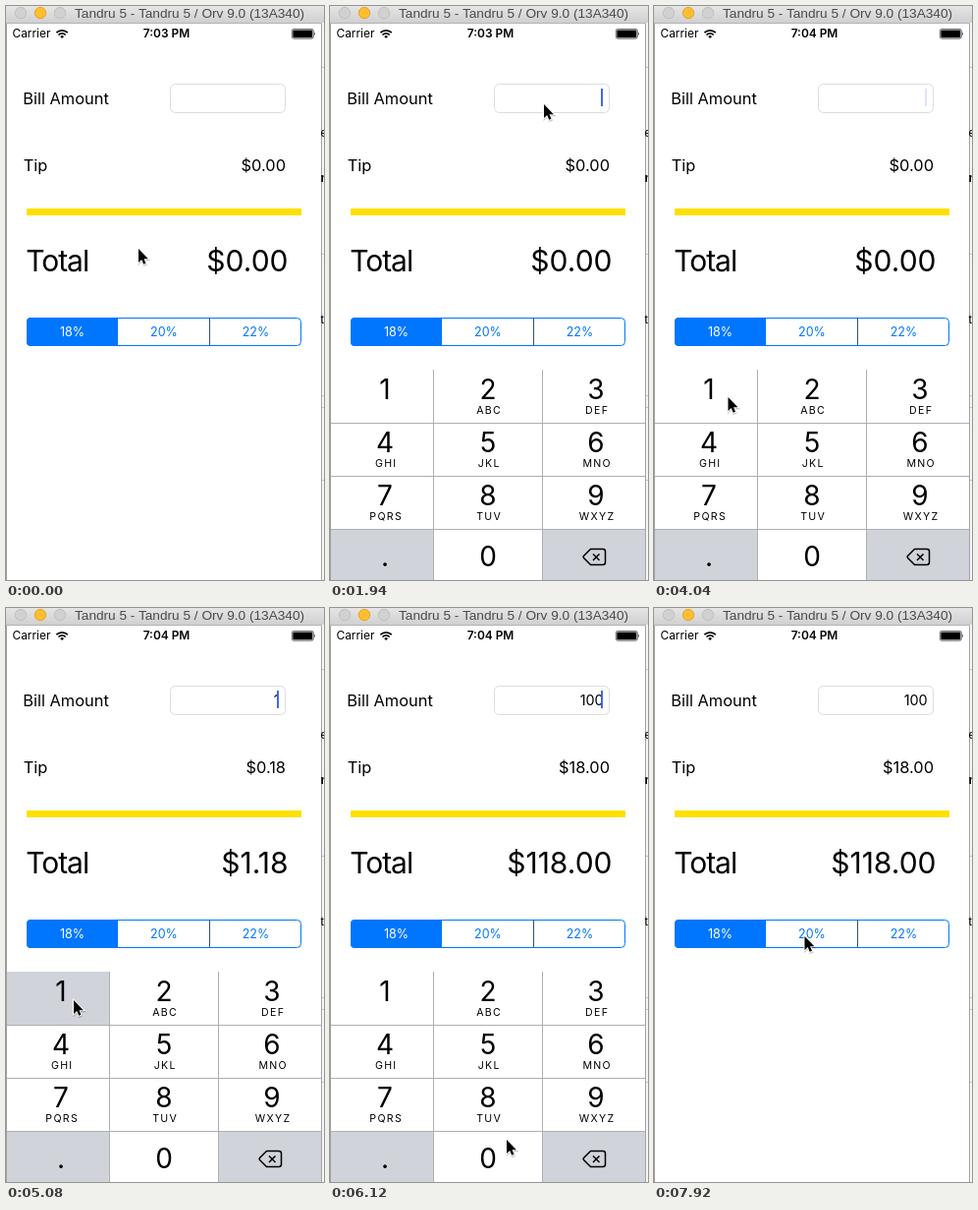
An HTML page for the animation above (8000 ms loop, 324 by 584 pixels).

```html
<!DOCTYPE html>
<html lang="en">
<head>
<meta charset="utf-8">
<title>Tip calculator</title>
<style>
  html, body { margin: 0; width: 100%; height: 100%; overflow: hidden; background: #fff; }
  svg { display: block; width: 324px; height: 584px; font-family: Inter, sans-serif; }
  .title { font: 13.65px "Liberation Sans", Arial, sans-serif; fill: #4b4b4b; }
  .status { font-size: 11.9px; }
  .label { font-size: 16.4px; }
  .big { font-size: 30px; }
  .total { letter-spacing: -.035em; }
  .field { font-size: 14.4px; }
  .seg { font-size: 12.5px; fill: #0076ff; text-anchor: middle; }
  .seg .on { fill: #fff; }
  .digit { font-size: 28px; text-anchor: middle; }
  .sub { font-size: 10.6px; letter-spacing: 1.3px; text-anchor: middle; }
  .end { text-anchor: end; }
  .peek { font: 12px "Liberation Sans", Arial, sans-serif; }
</style>
</head>
<body>
<svg viewBox="0 0 324 584">
  <defs>
    <linearGradient id="bar" x2="0" y2="1">
      <stop stop-color="#e6e5e6"/><stop offset="1" stop-color="#d1d0d1"/>
    </linearGradient>
    <clipPath id="screen"><path d="M1 18h320v566H1z"/></clipPath>
  </defs>

  <rect width="324" height="584" fill="#fff"/>

  <!-- window behind -->
  <path d="M321 18h3v566h-3z" fill="#f6f6f6"/>
  <path d="M322 62.5h2M322 252.5h2M322 396.5h2M322 408.5h2M322 482.5h2" stroke="#c4c4c4"/>
  <path d="M.5 17v567M321.5 17v567" stroke="#a3a3a3"/>
  <g class="peek">
    <text x="320.5" y="133">e</text>
    <text x="320.5" y="179" font-weight="700">n</text>
    <text x="320.5" y="323">t</text>
  </g>

  <!-- title bar -->
  <rect width="324" height="17" fill="url(#bar)"/>
  <path d="M0 17.5h322" stroke="#b4b3b4"/>
  <g stroke="#c1c0c1" fill="#d2d1d2">
    <circle cx="15" cy="7" r="5.7"/>
    <circle cx="35" cy="7" r="5.7" fill="#fdbe30" stroke="#e4a52c"/>
    <circle cx="55" cy="7" r="5.7"/>
  </g>
  <text class="title" x="70" y="12">Tandru 5 - Tandru 5 / Orv 9.0 (13A340)</text>

  <!-- status bar -->
  <text class="status" x="6.5" y="32.3">Carrier</text>
  <g fill="none" stroke="#000" stroke-width="1.7">
    <path d="M51.4 27.2a8 8 0 0 1 11.4 0M53.5 29.5a5 5 0 0 1 7.2 0"/>
    <path d="M57.1 33l-1.9-2a2.7 2.7 0 0 1 3.8 0z" fill="#000" stroke="none"/>
  </g>
  <text class="status" id="clock" x="163.5" y="32.3" font-weight="600" text-anchor="middle"></text>
  <rect x="291.3" y="23.4" width="22" height="9.800" rx="2" fill="none" stroke="#000" stroke-width=".6"/>
  <rect x="292.300" y="24.400" width="20" height="7.800" rx="1"/>
  <path d="M314.300 26.500q1.600 1.800 0 3.600z"/>

  <!-- form -->
  <text class="label" x="17.300" y="99.500">Bill Amount</text>
  <rect x="167.500" y="79.500" width="117" height="29" rx="5" fill="#fff" stroke="#dcdcdc"/>
  <text class="field end" id="bill" x="278.700" y="99"></text>
  <rect id="caret" x="276" y="84" width="2" height="18" fill="#4267e6"/>
  <text class="label" x="17.700" y="167.500">Tip</text>
  <text class="label end" id="tip" x="285" y="167.500"></text>
  <rect x="21" y="206" width="280" height="7" fill="#ffe000"/>
  <text class="big total" x="20.300" y="270.300">Total</text>
  <text class="big end" id="total" x="287.500" y="270.300"></text>

  <!-- tip rates -->
  <rect x="21.500" y="317.500" width="279" height="28" rx="4" fill="#fff" stroke="#0076ff"/>
  <path d="M114 317H25a4 4 0 0 0-4 4v21a4 4 0 0 0 4 4h89z" fill="#0076ff"/>
  <path d="M207.500 318v27" stroke="#34506f"/>
  <g class="seg">
    <text class="on" x="67.500" y="336">18%</text>
    <text x="161" y="336">20%</text>
    <text x="254.500" y="336">22%</text>
  </g>

  <g clip-path="url(#screen)"><g id="pad"></g></g>

  <g id="cursor">
    <path d="M.4 1v14l3.2-3 2 5 2.3-1-2-4.7h4.4z" opacity=".2" stroke="#000" stroke-width="2"/>
    <path d="M0 0v14l3.2-3 2 4.8 2.3-1-2-4.6h4.4z" stroke="#fff" stroke-width="1.8" paint-order="stroke"/>
  </g>
</svg>
<script>
const $ = id => document.getElementById(id);
const LOOP = 8000, TICK = 149; // the picture advances once per tick
const PAD_Y = 370, ROW = 54, PAD_H = 214, GREY = '#d0d3da';

const clamp = k => Math.max(0, Math.min(1, k));
const smooth = k => (1 - Math.cos(Math.PI * clamp(k))) / 2;
const money = v => '$' + v.toFixed(2);

function key(i, label, sub = '') {
  const col = i % 3, x = [56, 161, 271][col], left = [1, 106, 217][col];
  const y = PAD_Y + ROW * Math.floor(i / 3);
  const base = y + (i < 9 ? 30 : 37.5);
  return `<rect id="k${label}" x="${left}" y="${y}" width="110" height="54" fill="${i % 10 === 9 || i === 11 ? GREY : '#fff'}"/>
    <text class="digit" x="${x}" y="${base}">${label}</text>
    <text class="sub" x="${x + 1.2}" y="${y + 45.3}">${sub}</text>`;
}

function buildPad() {
  const subs = ['', 'ABC', 'DEF', 'GHI', 'JKL', 'MNO', 'PQRS', 'TUV', 'WXYZ'];
  $('pad').innerHTML = subs.map((s, i) => key(i, i + 1, s)).join('') +
    key(9, '.') + key(10, 0) + key(11, '') +
    '<path d="M105.5 370v216M216.5 370v216M1 424.5h320M1 478.5h320M1 532.5h320" stroke="#acafb4"/>' +
    '<path d="M265.5 552.5h12.500a2.500 2.500 0 0 1 2.500 2.500v11a2.500 2.500 0 0 1-2.500 2.500h-12.500l-7-7q-1-1 0-2z' +
    'M268 557.5l6.5 6.5M274.5 557.5l-6.5 6.5" fill="none" stroke="#000" stroke-width="1.5" stroke-linejoin="round"/>';
}

// Cursor stops: start tick, ticks taken, x, y
const moves = [
  [0, 4, 216, 59], [4, 1, 218, 100], [13, 4, 65, 424], [19, 3, 75.5, 398],
  [27, 1, 69, 399], [35, 3, 180, 541], [42, 4, 192, 372], [48, 5, 153.5, 334]
];

function cursorAt(n) {
  let x = 135, y = 247;
  for (const [start, span, tx, ty] of moves) {
    const k = smooth((n - start) / span);
    x += (tx - x) * k;
    y += (ty - y) * k;
  }
  return `${x} ${y}`;
}

// Keypad rises with an ease-out, later drops away
const slideAt = n => n < 30
  ? (1 - clamp((n - 9.8) / 3)) ** 3
  : smooth((n - 46) / 5);

function caretAt(n) {
  if (n < 10 || n > 46) return 0;
  if (n < 14 || (n > 33 && n < 44)) return 1; // steady after a tap or a digit
  const p = (n * 149.5 + 810) % 1000;
  return Math.min(clamp((p - 200) / 150), clamp((900 - p) / 300));
}

function draw(t) {
  const n = Math.floor(t / TICK);
  const bill = n < 34 ? 0 : n < 38 ? 1 : n < 40 ? 10 : 100;
  $('clock').textContent = n < 14 ? '7:03 PM' : '7:04 PM';
  $('bill').textContent = bill || '';
  $('tip').textContent = money(bill * .18);
  $('total').textContent = money(bill * 1.18);
  $('caret').setAttribute('opacity', caretAt(n));
  $('k1').setAttribute('fill', n === 33 || n === 34 ? GREY : '#fff');
  $('k0').setAttribute('fill', n === 38 || n === 40 ? GREY : '#fff');
  $('pad').setAttribute('transform', `translate(0 ${slideAt(n) * PAD_H})`);
  $('cursor').setAttribute('transform', `translate(${cursorAt(n)})`);
}

function loop() {
  draw(performance.now() % LOOP);
  requestAnimationFrame(loop);
}

buildPad();
loop();
</script>
</body>
</html>
```
